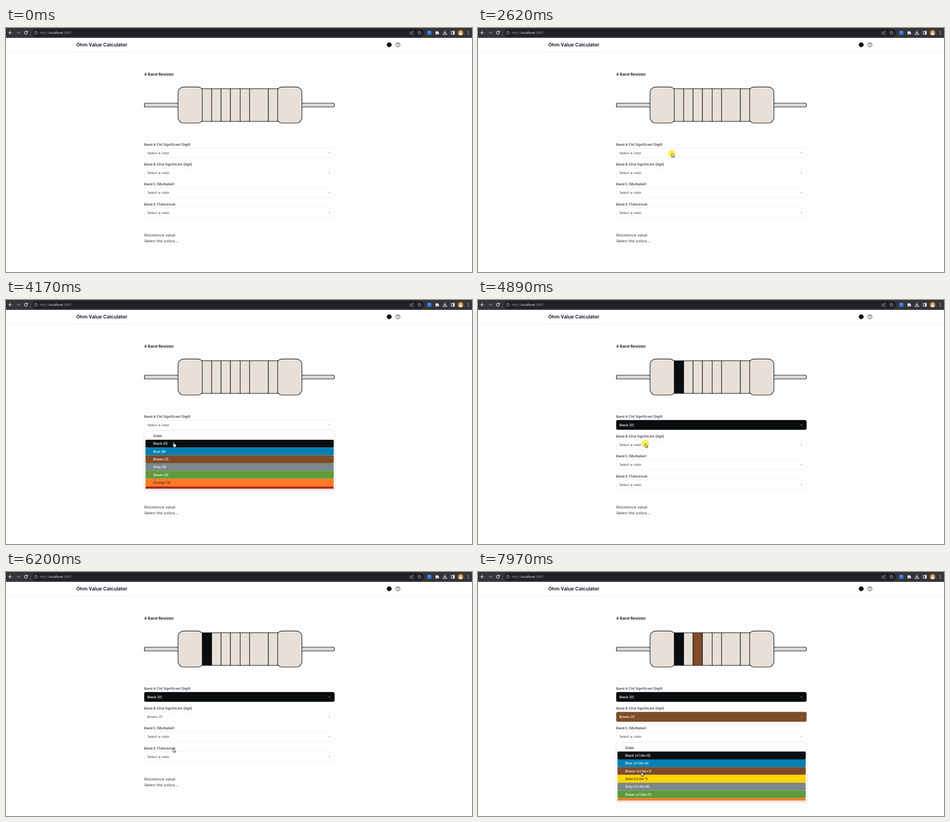
An HTML page that plays this animation: 1032 px wide and 543 px high, repeating every 8000 ms.

```html
<!DOCTYPE html>
<html lang="en">
<head>
<meta charset="utf-8">
<title>Ohm Value Calculator</title>
<style>
  html, body { margin: 0; width: 100%; height: 100%; overflow: hidden; background: #fefefe; }
  svg { display: block; width: 1032px; height: 543px; }
  text { font-family: Inter, sans-serif; font-size: 7.58px; fill: #3f4550; text-rendering: geometricPrecision; }
  .title { font-size: 10.83px; font-weight: 600; fill: #0b1020; }
  .head { font-size: 8.67px; font-weight: 600; fill: #0b1020; }
  .body { font-size: 8.67px; fill: #383f4a; }
  .label { font-weight: 500; fill: #252d3d; }
  .url { font-family: "Noto Sans", "Open Sans", sans-serif; font-size: 7.2px; fill: #9aa0a6; }
  .line { fill: none; stroke-linecap: round; stroke-linejoin: round; }
  .bar .line { stroke: #e8eaed; stroke-width: 1.2; }
  .bar .thin { stroke: #bdc1c6; stroke-width: .8; }
  .part { fill: #e7e0d9; stroke: #000; stroke-width: 1.15; }
  .wire { fill: #d9d9d9; stroke: #000; stroke-width: 1.15; }
  .pointer { fill: #fff; stroke: #111; stroke-width: .8; stroke-linejoin: round; }
</style>
</head>
<body>
<svg viewBox="0 0 1032 543">
  <defs>
    <clipPath id="view"><rect x="-211" y="0" width="422" height="128.7"/></clipPath>
    <filter id="shadow" x="-5%" y="-5%" width="110%" height="115%">
      <feDropShadow dx="0" dy="1.6" stdDeviation="1.5" flood-opacity=".16"/>
    </filter>
  </defs>

  <g class="bar">
    <rect width="1032" height="22" fill="#35363a"/>
    <rect x="57" y="1.5" width="869" height="18" rx="9" fill="#202124"/>
    <path class="line" d="M13 10.5H6.6M9.6 7.4L6.5 10.5L9.6 13.6"/>
    <path class="line" style="stroke:#7d8084" d="M23.6 10.5H30.2M27.2 7.4L30.3 10.5L27.2 13.6"/>
    <path class="line" d="M46.9 8.6A3.3 3.3 0 1 0 47.3 11.4M47.4 6.8V9.1H45"/>
    <circle class="line thin" cx="66" cy="10.5" r="3.3"/>
    <path class="line thin" d="M66 10.2V12.2M66 8.7V8.8"/>
    <text class="url" x="74.5" y="13">http://<tspan fill="#f1f3f4">localhost</tspan>:3000</text>
    <path class="line thin" d="M896.6 9H895V14H901.4V12.4M897 11.5Q897.4 8.4 901.8 8.4M900 6.6L902 8.4L900 10.2"/>
    <path class="line thin" d="M915.5 6.7l1.1 2.5 2.7.3-2 1.8.6 2.7-2.4-1.4-2.4 1.4.6-2.7-2-1.8 2.7-.3z"/>
    <rect x="933.3" y="6.2" width="8.4" height="8.4" rx="1" fill="#4285f4"/>
    <path fill="#e8eaed" d="M951 8h2.2a1.3 1.3 0 0 1 2.6 0H958v2.3a1.3 1.3 0 0 1 0 2.6V14.5H955.8a1.3 1.3 0 0 0-2.6 0H951V12.2a1.3 1.3 0 0 0 0-2.4z"/>
    <path class="line" d="M972 6V11.6M969.6 9.4L972 11.8L974.4 9.4M968.2 12.4V14.3H975.8V12.4"/>
    <rect class="line" x="986" y="7" width="7" height="7"/>
    <rect x="989.7" y="7" width="3.3" height="7" fill="#e8eaed"/>
    <circle cx="1006.8" cy="10.3" r="6" fill="#c98a35"/>
    <path d="M1001.6 13.3A6 6 0 0 0 1012 13.3Q1006.8 8.5 1001.6 13.3Z" fill="#eadfca"/>
    <circle cx="1006.8" cy="9.8" r="2.6" fill="#f0cf91"/>
    <g fill="#e8eaed">
      <circle cx="1024" cy="7.3" r=".9"/><circle cx="1024" cy="10.5" r=".9"/><circle cx="1024" cy="13.7" r=".9"/>
    </g>
  </g>

  <rect y="22" width="1032" height="30.5" fill="#fff"/>
  <path d="M0 52.5H1032" stroke="#e5e8ec" stroke-width=".8"/>
  <text class="title" x="155.7" y="41.2">Ohm Value Calculator</text>
  <circle cx="848.7" cy="37.3" r="5.4" fill="#10151f"/>
  <circle cx="868" cy="37.4" r="4.6" class="line" stroke="#10151f"/>
  <path class="line" stroke="#10151f" stroke-width=".95" d="M866.6 36.2A1.45 1.45 0 1 1 868.6 37.5Q868 37.8 868 38.4M868 39.8V39.9"/>

  <text class="head" x="306" y="106">4 Band Resistor</text>
  <rect class="wire" x="306.4" y="167.2" width="90" height="8.5" rx="3"/>
  <rect class="wire" x="637" y="167.2" width="90.3" height="8.5" rx="3"/>
  <rect class="part" x="381" y="131.3" width="56.3" height="80.2" rx="13"/>
  <rect class="part" x="599" y="131.3" width="56.4" height="80.2" rx="13"/>
  <g id="strips"></g>

  <g id="fields"></g>
  <text class="body" x="306" y="464.2">Resistance value</text>
  <text class="body" x="306" y="477.2">Select the colors...</text>
  <g id="menus"></g>

  <g id="cursor">
    <circle id="click" r="8.3" cx=".3" cy="1" fill="#ffec1f" opacity=".8"/>
    <path id="arrow" class="pointer" d="M.3 0V9.2L2.4 7.3L3.8 10.4L5.2 9.8L3.8 6.8H6.7Z"/>
    <path id="hand" class="pointer" d="M-1 1Q0-.6 1 1V4.4Q2.1 3.8 2.6 4.8Q3.6 4.3 4.1 5.3Q5.4 5 5.5 6.4V8.6Q5.4 10 4.5 11.6H-.2Q-1-.0 -1 9.8L-3 7.2Q-2.8 5.7-1 7.2Z"/>
  </g>
</svg>
<script>
const LOOP = 8000, ROW = 17.33;
const $ = id => document.getElementById(id);
const COLORS = {
  Black: '#0b0e0f', Blue: '#0080b5', Brown: '#7f4c28', Gold: '#ffd500',
  Gray: '#7b878c', Green: '#5e9b39', Orange: '#fc7a27', Red: '#b02a1c'
};
const digits = ['Black (0)', 'Blue (6)', 'Brown (1)', 'Gray (8)', 'Green (5)', 'Orange (3)', 'Red (2)'];
const powers = ['Black (x1.0e+0)', 'Blue (x1.0e+6)', 'Brown (x1.0e+1)', 'Gold (x1.0e-1)',
  'Gray (x1.0e+8)', 'Green (x1.0e+5)', 'Orange (x1.0e+3)'];

function add(parent, tag, attrs, content) {
  const el = document.createElementNS('http://www.w3.org/2000/svg', tag);
  for (const key in attrs) el.setAttribute(key, attrs[key]);
  if (content) el.textContent = content;
  parent.appendChild(el);
  return el;
}

// Resistor strips between neighbouring edges
const edges = [434.6, 455.5, 476.3, 497, 518.6, 539.5, 581, 601.6];
const strips = edges.slice(1).map((x, i) =>
  add($('strips'), 'rect', { class: 'part', x: edges[i], y: 135.2, width: x - edges[i], height: 72.6 }));

// Select fields
const titles = ['A (1st Significant Digit)', 'B (2nd Significant Digit)', 'C (Multiplier)', 'D (Tolerance)'];
const fieldY = i => 278 + i * 44.33;
const fields = titles.map((title, i) => {
  const y = fieldY(i), g = $('fields');
  add(g, 'text', { class: 'label', x: 306, y: y - 16.3 }, 'Band ' + title);
  return {
    box: add(g, 'rect', { x: 306.3, y: y - 10.6, width: 421, height: 21.2, rx: 3, 'stroke-width': .7 }),
    text: add(g, 'text', { x: 313, y: y + 2.8 }),
    arrow: add(g, 'path', { class: 'line', d: `M714.1 ${y - 1}l2.2 2.2l2.2-2.2`, 'stroke-width': .85 })
  };
});

function setField(i, value, tinted) {
  const f = fields[i], color = COLORS[value.split(' ')[0]];
  f.box.setAttribute('fill', tinted ? color : '#fff');
  f.box.setAttribute('stroke', tinted ? color : '#e2e6ec');
  f.text.textContent = value;
  f.text.style.fill = tinted ? '#fff' : '';
  f.text.style.fontWeight = tinted ? 500 : 400;
  f.arrow.setAttribute('stroke', tinted ? '#b5aea8' : '#7d8289');
}

// Drop-down menus, drawn around their top centre
function makeMenu(field, items, open, close) {
  const g = add($('menus'), 'g', {});
  add(g, 'rect', { x: -210.8, y: 0, width: 421.6, height: 130, rx: 3, fill: '#fff',
    stroke: '#e2e6ec', 'stroke-width': .7, filter: 'url(#shadow)' });
  add(g, 'text', { x: -191, y: 13.7, 'font-weight': 600, style: 'fill:#252d3d' }, 'Color');
  const list = add(g, 'g', { 'clip-path': 'url(#view)' });
  items.forEach((item, i) => {
    const name = item.split(' ')[0], y = 19.6 + i * ROW;
    const ink = name == 'Orange' || name == 'Gold' ? '#4a2c14' : '#fff';
    add(list, 'rect', { x: -208.2, y, width: 417, height: ROW, rx: 2, fill: COLORS[name] });
    add(list, 'text', { x: -191, y: y + 11.5, 'font-weight': 500, style: 'fill:' + ink }, item);
  });
  return { g, y: fieldY(field) + 13.3, open, close };
}
const menus = [
  makeMenu(0, digits, 2690, 4240),
  makeMenu(1, digits, 4970, 6200),
  makeMenu(2, powers, 7690, LOOP)
];

function drawMenu(m, t) {
  const shown = t >= m.open && t < m.close;
  m.g.style.display = shown ? '' : 'none';
  if (!shown) return;
  const age = t - m.open, p = age < 60 ? .45 : age < 130 ? .91 : 1;
  m.g.setAttribute('opacity', p);
  m.g.setAttribute('transform', `translate(517 ${m.y - 4.3 * (1 - p)}) scale(${.95 + .05 * p})`);
}

// Pointer moves: start, end, number of steps, target x, y
const moves = [
  [490, 1250, 12, 532, 187], [1320, 1670, 6, 326, 88], [1740, 2090, 6, 434, 261],
  [2220, 2290, 2, 429, 278.5], [2820, 3020, 4, 404, 304], [3170, 3710, 9, 371, 316],
  [4700, 4770, 2, 370.3, 319], [5100, 5440, 6, 375, 392], [5510, 5580, 2, 375, 402],
  [5780, 5910, 3, 369.7, 392], [6670, 7090, 7, 358, 328], [7350, 7420, 2, 361.3, 360.5],
  [7760, 7970, 4, 361.5, 445.5]
];
const clicks = [[2550, 2690], [4040, 4170], [4830, 4970], [6130, 6200], [7620, 7690]];
const hands = [[3440, 4240], [5300, 6200]];
const within = (spans, t) => spans.some(([a, b]) => t >= a && t < b);

function pointerAt(t) {
  let x = 941, y = 527;
  for (const [start, end, n, tx, ty] of moves) {
    if (t < start) break;
    const step = Math.min(n, 1 + Math.floor((t - start) / (end - start) * (n - 1) + .001));
    const p = step / n, e = p * p * (3 - 2 * p);
    x += (tx - x) * e;
    y += (ty - y) * e;
  }
  return [x, y];
}

const show = (id, on) => { $(id).style.display = on ? '' : 'none'; };

function draw(t) {
  const first = t >= 4240, second = t >= 6270;
  setField(0, first ? 'Black (0)' : 'Select a color', first);
  setField(1, t >= 6200 ? 'Brown (1)' : 'Select a color', second);
  strips[0].style.fill = first ? COLORS.Black : '';
  strips[2].style.fill = second ? COLORS.Brown : '';
  menus.forEach(m => drawMenu(m, t));

  const hand = within(hands, t);
  show('cursor', t >= 490);
  show('click', within(clicks, t));
  show('hand', hand);
  show('arrow', !hand);
  $('cursor').setAttribute('transform', `translate(${pointerAt(t)})`);
}

setField(2, 'Select a color', false);
setField(3, 'Select a color', false);
const begin = performance.now();
function tick() {
  draw((performance.now() - begin) % LOOP);
  requestAnimationFrame(tick);
}
tick();
</script>
</body>
</html>
```
